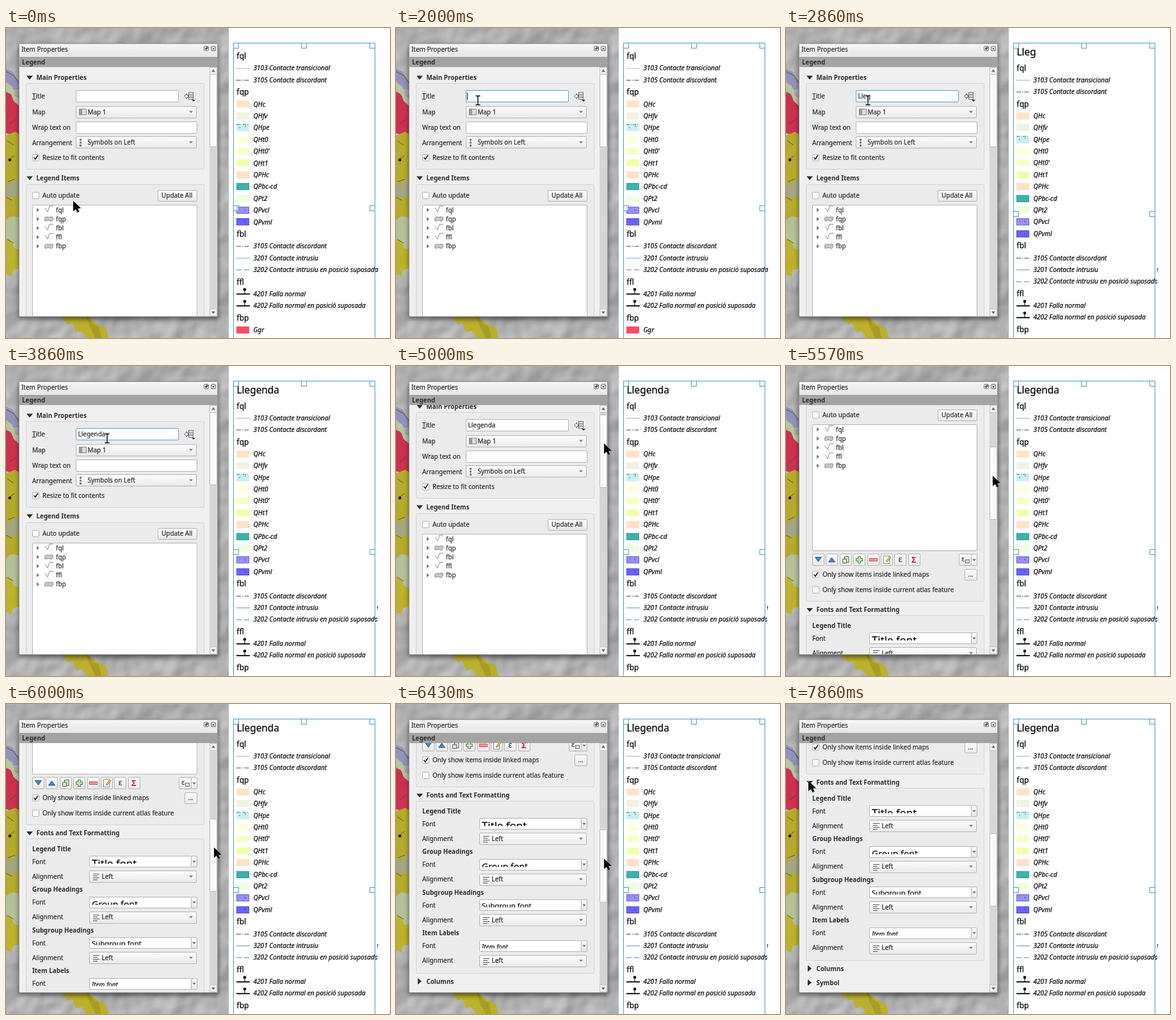
Write an HTML page that moves like this. It is 600 by 484 pixels and loops after 8000 ms.

```html
<!DOCTYPE html>
<html lang="en">
<head>
<meta charset="utf-8">
<title>Legend item properties</title>
<style>
  html, body { margin: 0; width: 100%; height: 100%; overflow: hidden; background: #aaa; }
  svg { display: block; width: 600px; height: 484px; }
  text { font: 9.95px "Noto Sans", "Open Sans", sans-serif; fill: #2b2b2b; stroke: #2b2b2b; stroke-width: .2px; white-space: pre; }
  .bold { font-weight: 700; font-size: 9.85px; stroke: none; }
  .item { font-size: 10.1px; font-style: italic; fill: #000; stroke: #000; }
  .group { font-size: 12px; fill: #000; stroke: #000; }
  .heading { font-size: 15.4px; fill: #000; stroke: #000; }
  .swatch { shape-rendering: crispEdges; }
</style>
</head>
<body>
<svg id="stage" viewBox="0 0 600 484" xmlns="http://www.w3.org/2000/svg"></svg>
<script>
const stage = document.getElementById('stage');

// Drawing helpers
const rect = (x, y, w, h, fill, stroke = 'none', extra = '') =>
  `<rect x="${x}" y="${y}" width="${w}" height="${h}" fill="${fill}" stroke="${stroke}" ${extra}/>`;
const path = (d, fill, stroke = 'none', extra = '') =>
  `<path d="${d}" fill="${fill}" stroke="${stroke}" ${extra}/>`;
const text = (x, middle, label, kind = '') =>
  `<text x="${x}" y="${middle + 3.6}" class="${kind}">${label}</text>`;
const at = (x, y, body) => `<g transform="translate(${x} ${y})">${body}</g>`;

const BORDER = '#b4b4b4';
const box = (x, y, w, h, fill = '#fff') =>
  rect(x + .5, Math.round(y) + .5, w - 1, h - 1, fill, BORDER, 'rx="1.5"');
const button = (x, y, w, h) => box(x, y, w, h, 'url(#raised)');
const frame = (top, bottom) => rect(31.5, top + .5, 278, bottom - top, '#ebebeb', '#d2d2d2', 'rx="2"');
const dropArrow = (x, y) => path(`M${x - 3} ${y - 1.5}h6l-3 3.2z`, '#777');
const combo = (x, middle, label, labelX) =>
  button(x, middle - 9, 298 - x, 19) + dropArrow(289, middle) + text(labelX, middle, label);
const section = (middle, label, open) =>
  path(open ? `M32 ${middle - 2.5}h10l-5 6z` : `M34 ${middle - 5}v10l6-5z`, '#2c2c2c') + text(47.5, middle, label, 'bold');
const check = (middle, label, on) =>
  box(41, middle - 5.5, 11, 11) +
  (on ? path(`M43.5 ${middle}l2.3 2.8l4-6`, 'none', '#222', 'stroke-width="1.7"') : '') + text(57, middle, label);

// Legend tree icons
const lineIcon = y => path(`M61 ${y - 3}l4 6l3-9h6`, 'none', '#8a8a8a');
const areaIcon = y => path(`M61 ${y + 3}c-1-5 0-7 4-6c3 1 5-1 8 0c1 2 0 5-1 6c-3 1-4-1-6-1c-2 0-3 2-5 1z`, '#c9c9c9', '#858585');

function mainProperties() {
  const dataIcon = at(278, 100,
    path('M.5 6.500l4-4v2h2v4h-2v2z', '#eee', '#666') + rect(7.5, .5, 7, 11, '#e8e8e8', '#777') +
    path('M8 3.500h6M8 6h6M8 8.500h6', 'none', '#777') + path('M12 12h6l-3 3z', '#333'));
  const mapIcon = rect(114.5, 126.5, 11, 9, '#ddd', '#888') + path('M115 127h4v8h-4z', '#999');
  const dots = [174, 178.5, 183].map(y => rect(115, y - 1, 3, 3, '#777')).join('');
  return section(77, 'Main Properties', true) + frame(86, 220) +
    text(41, 106, '<tspan text-decoration="underline">T</tspan>itle') +
    `<rect id="field" x="109.5" y="97.5" width="160" height="18" rx="1.5" fill="#fff"/>` +
    `<text id="typed" x="112.5" y="109.8"></text>` + dataIcon +
    text(41, 131, 'Map') + combo(109, 131, 'Map 1', 127.5) + mapIcon +
    text(41, 155, 'Wrap text on') + box(109, 146, 190, 19) +
    text(41, 179, 'Arrangement') + combo(109, 178.4, 'Symbols on Left', 127.5) + dots +
    check(202, 'Resize to fit contents', true);
}

function legendItems() {
  const rows = ['fql', 'fqp', 'fbl', 'ffl', 'fbp'].map((name, i) => {
    const y = 284 + i * 14.2;
    return path(`M48 ${y - 3.2}v6.4l4-3.2z`, '#777') + (i % 3 === 1 ? areaIcon(y) : lineIcon(y)) + text(78, y, name);
  }).join('');
  const icons = [
    path('M4.500 5.500h10l-5 7z', '#4a86c0', '#2a5688'),
    path('M4.500 13h10l-5-7z', '#4a86c0', '#2a5688'),
    path('M4.500 8.500h6v6h-6zM9 4.500h5v9h-4', '#dfe8d8', '#55604f') + path('M6 6h3M7.500 4v4', 'none', '#3a8a3a'),
    path('M7.500 4.500h4v3h3v4h-3v3h-4v-3h-3v-4h3z', '#c5e0b8', '#41803a'),
    rect(3.5, 7.5, 12, 4, '#f7c4c4', '#d03030') + path('M5 9.500h9', 'none', '#d03030', 'stroke-dasharray="2 1"'),
    path('M4.500 3.500h9v12h-9z', '#fff', '#888') + path('M8 12l6-8l2 1.500l-6 7.500z', '#e8c840', '#6a5a20', 'stroke-width=".7"'),
    '<text x="6.500" y="13" style="font-size:12.5px;fill:#33336a;stroke:#33336a">ε</text>',
    '<text x="5" y="14" style="font-size:12.5px;font-weight:700;fill:#c8103c;stroke:none">Σ</text>'
  ].map((icon, i) => at(Math.round(41 + i * 21.4), 478, button(0, 0, 19, 19) + icon)).join('');
  return section(234, 'Legend Items', true) + frame(244, 552) +
    check(261.5, 'Auto update', false) + button(237, 253, 62, 18) + text(243, 261.5, 'Update All') +
    box(41, 276, 258, 198) + rows + icons +
    button(270, 478, 20, 19) + button(289, 478, 10, 19) + dropArrow(294, 488) +
    '<text x="274" y="490" style="font-size:11px;fill:#555">ε</text>' + rect(280.5, 487.5, 6, 5, '#ddd', '#777') +
    check(510.5, 'Only show items inside linked maps', true) +
    button(279, 502, 20, 18) + text(284.5, 510, '...') +
    check(534, 'Only show items inside current atlas feature', false);
}

function fontSettings() {
  const styles = [
    ['Legend Title', 'Title font', 16.8, 17], ['Group Headings', 'Group font', 14, 15.5],
    ['Subgroup Headings', 'Subgroup font', 11.4, 13.2], ['Item Labels', 'Item font', 10, 12.5]
  ];
  return section(565.5, 'Fonts and Text Formatting', true) + frame(574, 843) +
    styles.map(([title, sample, size, base], i) => {
      const y = 590.2 + i * 63.5, top = Math.round(y + 11), slant = i === 3 ? 'italic' : 'normal';
      return text(41, y, title, 'bold') + text(41, y + 20, 'Font') +
        box(130, top, 160, 18) + button(289, top, 10, 18) + dropArrow(294, y + 20) +
        `<svg x="131" y="${top + 1}" width="157" height="11.500"><text x="3" y="${base}" style="font-size:${size}px;font-style:${slant};fill:#000">${sample}</text></svg>` +
        text(41, y + 43, 'Alignment') + combo(130, y + 43, 'Left', 149.5) +
        path(`M136 ${top + 28.5}h10m-10 3h7m-7 3h10m-10 3h7`, 'none', '#555');
    }).join('');
}

function collapsedSections() {
  const names = ['Columns', 'Symbol', 'WMS LegendGraphic', 'Spacing', 'Position and Size', 'Rotation',
    'Frame', 'Background', 'Item ID', 'Rendering', 'Variables'];
  return names.map((name, i) => section(856 + i * 22, name, name === 'Variables')).join('') +
    frame(1086, 1302) + box(41, 1096, 258, 196);
}

function terrain() {
  return rect(0, 0, 348, 484, '#aaa', 'none', 'filter="url(#relief)"') +
    `<g opacity=".9">` +
    path('M0 64l10 4l6 10l5 4v14H0z', '#8d8fbd') +
    path('M0 100l12 4l9 8v54l-9 2l-12-4z', '#cf2444') +
    path('M0 84l10 8l4 14l7 4v12l-9-8l-4-10l-8-6z', '#b9c79b') +
    path('M0 168l14-6l7 4v70l-9 2l-5 8l-7-4z', '#b7aa1e') +
    path('M0 242l7 4l5-8l9-2v26l-10 4l-11-3z', '#a3a67c') +
    path('M0 263l11 3l10-4v34l-10-2l-6 8l-5-2z', '#b7aa1e') +
    path('M0 300l8-6l13 4v48l-8-2l-6-12l-7-4z', '#b4c294') +
    path('M0 328l7 4l6 12l8 2v30l-10 2l-3 10l-8-4z', '#c0b220') +
    path('M86 450l11 13l7-3l5 15l9-2l8 11h34l-3-15l-16-8l-13-11z', '#bdb01e') +
    path('M128 450l8 12l9 4l4 18h-9l-9-18l-6-16z', '#a99b18') +
    '</g>' +
    path('M2 176l10 7M4 206l9-7M3 240l11-4M0 264l9 5M6 150l10-8M2 330l10 6M0 68l12 6l8 12', 'none', '#4a4318', 'stroke-width=".8"') +
    '<circle cx="6" cy="206" r="2.2"/>';
}

function legendRows() {
  const list = [
    ['fql'], ['3103 Contacte transicional', 'dots'], ['3105 Contacte discordant', 'dashdot'],
    ['fqp'], ['QHc', '#ffe3c8'], ['QHfv', '#f0f3e2'], ['QHpe', '#c8f1f0'], ['QHt0', '#feffdf'],
    ["QHt0'", '#f8ffc6'], ['QHt1', '#f0ffac'], ['QPHc', '#ffe1c9'], ['QPbc-cd', '#3fb1ac'],
    ['QPt2', '#efffe0'], ['QPvcl', '#9b8fff'], ['QPvml', '#6c63ff'],
    ['fbl'], ['3105 Contacte discordant', 'dashdot'], ['3201 Contacte intrusiu', 'intrusion'],
    ['3202 Contacte intrusiu en posició suposada', 'dashes'],
    ['ffl'], ['4201 Falla normal', 'fault'], ['4202 Falla normal en posició suposada', 'fault'],
    ['fbp'], ['Ggr', '#ff4a63']
  ];
  const dashes = { dots: ['#555', '1 1.2'], dashdot: ['#444', '7 2 1.5 2'], dashes: ['#5c7fa8', '8 4'], intrusion: ['#3f86d8', '2 .8'] };
  let y = 25.1;
  return list.map(([label, look]) => {
    y += look ? 18.4 : 19.3;
    const line = `M360 ${y + .3}h21`;
    if (!look) return text(360.5, y + .3, label, 'group');
    let symbol;
    if (look === 'fault') {
      symbol = path(line, 'none', '#000', 'stroke-width="1.8"') +
        path(`M373 ${y}v-6`, 'none', '#000') + `<circle cx="373" cy="${y - 6.8}" r="2.3"/>`;
    } else if (dashes[look]) {
      const [color, dash] = dashes[look];
      symbol = path(line, 'none', color, `stroke-dasharray="${dash}" ${look === 'intrusion' ? 'id="intrusion"' : ''}`);
    } else {
      symbol = rect(360, y - 5.5, 20, 11, look, 'none', 'class="swatch"');
      const outline = color => rect(360.5, y - 5, 19, 10, 'none', color, 'stroke-dasharray="1.5 1.5"');
      if (label === 'QHpe') symbol += path(`M360 ${y - 5}h20M364 ${y}h2m7-2h2`, 'none', '#2f6f72', 'stroke-dasharray="5 2 1 2"');
      if (label === 'QPbc-cd') symbol += outline('#2f8f8c');
      if (label.startsWith('QPv')) symbol += outline('#3a3490') + path(`M365 ${y - 2}l1 1m6-1l3 3`, 'none', '#3a3490');
    }
    return symbol + text(386.5, y, label, 'item');
  }).join('');
}

const handle = (x, y) => rect(x + .5, y + .5, 8, 8, '#fff', '#4b9bc9', 'fill-opacity=".6"');
const LONG_ROW = '3202 Contacte intrusiu en posició suposada';

stage.innerHTML = `
<defs>
  <linearGradient id="raised" x2="0" y2="1"><stop stop-color="#fcfcfc"/><stop offset="1" stop-color="#e9e9e9"/></linearGradient>
  <linearGradient id="bar" x2="0" y2="1"><stop stop-color="#f6f6f6"/><stop offset="1" stop-color="#e6e6e6"/></linearGradient>
  <filter id="relief" x="0" y="0" width="1" height="1" color-interpolation-filters="sRGB">
    <feTurbulence type="fractalNoise" baseFrequency=".016" numOctaves="3" seed="7"/>
    <feDiffuseLighting surfaceScale="3" lighting-color="#f4f4f4"><feDistantLight azimuth="225" elevation="46"/></feDiffuseLighting>
  </filter>
  <filter id="soft"><feGaussianBlur stdDeviation="3.5"/></filter>
  <clipPath id="view"><rect x="22" y="61" width="296" height="389"/></clipPath>
  <clipPath id="painted"><rect x="348" width="232" height="484"/></clipPath>
  <clipPath id="stale"><rect x="580" width="20" height="484"/></clipPath>
</defs>
${terrain()}
${rect(20, 27, 312, 428, '#000', 'none', 'opacity=".5" filter="url(#soft)"')}
${rect(348, 0, 252, 484, '#fff')}
${rect(20.5, 24.5, 310, 426, '#efefef', '#9c9c9c', 'rx="2"')}
${rect(21, 25, 309, 19, 'url(#bar)')}
${text(24, 33, 'Item Properties')}
${[313, 324].map(x => rect(x - 3.5, 28.5, 7, 7, '#f4f4f4', '#777', 'rx="1.5"')).join('')}
${path('M311.500 33.500v-2h2v2zM313 31v-1h2v2h-1M322 30.500l4 4m0-4l-4 4', 'none', '#333')}
${rect(21, 45, 309, 16, '#a3a3a3')}
${text(25, 53, 'Legend', 'bold')}
<g clip-path="url(#view)"><g id="content">
  ${mainProperties()}${legendItems()}${fontSettings()}${collapsedSections()}
  ${path('M111.500 101v11', 'none', '#111', 'id="caret"')}
</g></g>
${rect(318, 61, 12, 389, '#d6d6d6')}
${rect(318.5, 61.5, 11, 11, '#f1f1f1', '#c4c4c4')}${rect(318.5, 438.5, 11, 11, '#f1f1f1', '#c4c4c4')}
${path('M321 68.500h6l-3-4zM321 442.500h6l-3 4z', '#666')}
${rect(318.5, 72.5, 11, 113, '#fafafa', '#b8b8b8', 'id="thumb" rx="1"')}
<g clip-path="url(#painted)">
  <text id="heading" class="heading" x="360.5" y="42.5"></text>
  <g id="rows">${legendRows()}</g>
  <path d="M355.500 484V23.500H576.500V484" fill="none" stroke="#4b9bc9"/>
  ${handle(355, 23)}${handle(461, 23)}${handle(568, 23)}
  <g id="sides">${handle(355, 277)}${handle(568, 277)}</g>
</g>
<g clip-path="url(#stale)">${text(386.5, 377.6, LONG_ROW, 'item')}</g>
${path('M0 0V16L4 13L6.500 18L9.500 16.800L7.200 12L12 11.200Z', '#0a0a0a', '#ddd', 'id="arrow" stroke-width="1" stroke-linejoin="round" paint-order="stroke"')}
<g id="beam" fill="none">${['#fff', '#000'].map((color, i) =>
  path('M-3.500 -7H-1L0 -6L1 -7H3.500M0 -6V6M-3.500 7H-1L0 6L1 7H3.500', 'none', color, `stroke-width="${i ? 1.4 : 3}"`)).join('')}</g>`;

const part = Object.fromEntries([...stage.querySelectorAll('[id]')].map(node => [node.id, node]));
const move = (node, x, y) => node.setAttribute('transform', `translate(${x} ${y})`);
const show = (node, on) => node.setAttribute('visibility', on ? 'visible' : 'hidden');
const clamp = (v, low, high) => Math.min(high, Math.max(low, v));

const LOOP = 8000, TICK = 1000 / 7;
const TITLE = 'Llegenda';
const DRAG_TOP = 117, THUMB_RATIO = .294, MAX_SCROLL = 862;
const DRAG_START = 33, DRAG_END = 46;

// Pointer stops: tick, x, y
const stops = [
  [0, 105, 270], [8, 126, 114], [9, 128, 113], [26, 128, 113], [27, 158, 113], [32, 325, 117], [33, 325, 117],
  [35, 325, 121.1], [39, 323, 171.4], [40, 323, 447], [41, 324, 444], [42, 325, 224],
  [46, 325, 247.2], [48, 325, 247.2], [55, 35, 120]
];

function pointerAt(tick) {
  const next = Math.max(1, stops.findIndex(stop => stop[0] >= tick));
  const [t0, x0, y0] = stops[next - 1], [t1, x1, y1] = stops[next];
  let p = (tick - t0) / (t1 - t0);
  if (t1 - t0 > 4) p = p * p * (3 - 2 * p);
  return [x0 + (x1 - x0) * p, y0 + (y1 - y0) * p];
}

function render(time) {
  const tick = Math.floor((time % LOOP + 5) / TICK) % 56;
  const [x, y] = pointerAt(tick);
  const hover = tick < DRAG_START && x > 109 && x < 270 && y > 97 && y < 117;
  move(part.arrow, x, y);
  move(part.beam, x, y);
  show(part.arrow, !hover);
  show(part.beam, hover);
  part.field.setAttribute('stroke', hover ? '#55a5cf' : BORDER);

  const dragY = tick < DRAG_START ? DRAG_TOP : pointerAt(Math.min(tick, DRAG_END))[1];
  const scroll = clamp((dragY - DRAG_TOP) / THUMB_RATIO, 0, MAX_SCROLL);
  move(part.content, 0, -Math.round(scroll));
  move(part.thumb, 0, Math.round(scroll * THUMB_RATIO));

  const count = tick < 17 ? 0 : Math.min(TITLE.length, 1 + Math.floor((tick - 17) * 7 / 6));
  const title = TITLE.slice(0, count);
  part.typed.textContent = title;
  part.heading.textContent = title;
  show(part.caret, tick >= 8 && tick < 17 && (tick < 11 || tick >= 14));
  move(part.rows, 0, count ? 18.4 : 0);
  move(part.sides, 0, count ? 9 : 0);
  part.intrusion.setAttribute('stroke-dasharray', count ? 'none' : '2 .8');
  part.intrusion.setAttribute('stroke', count ? '#5f8fc0' : '#3f86d8');
}

const start = performance.now();
function loop() {
  render(performance.now() - start);
  requestAnimationFrame(loop);
}
loop();
</script>
</body>
</html>
```
